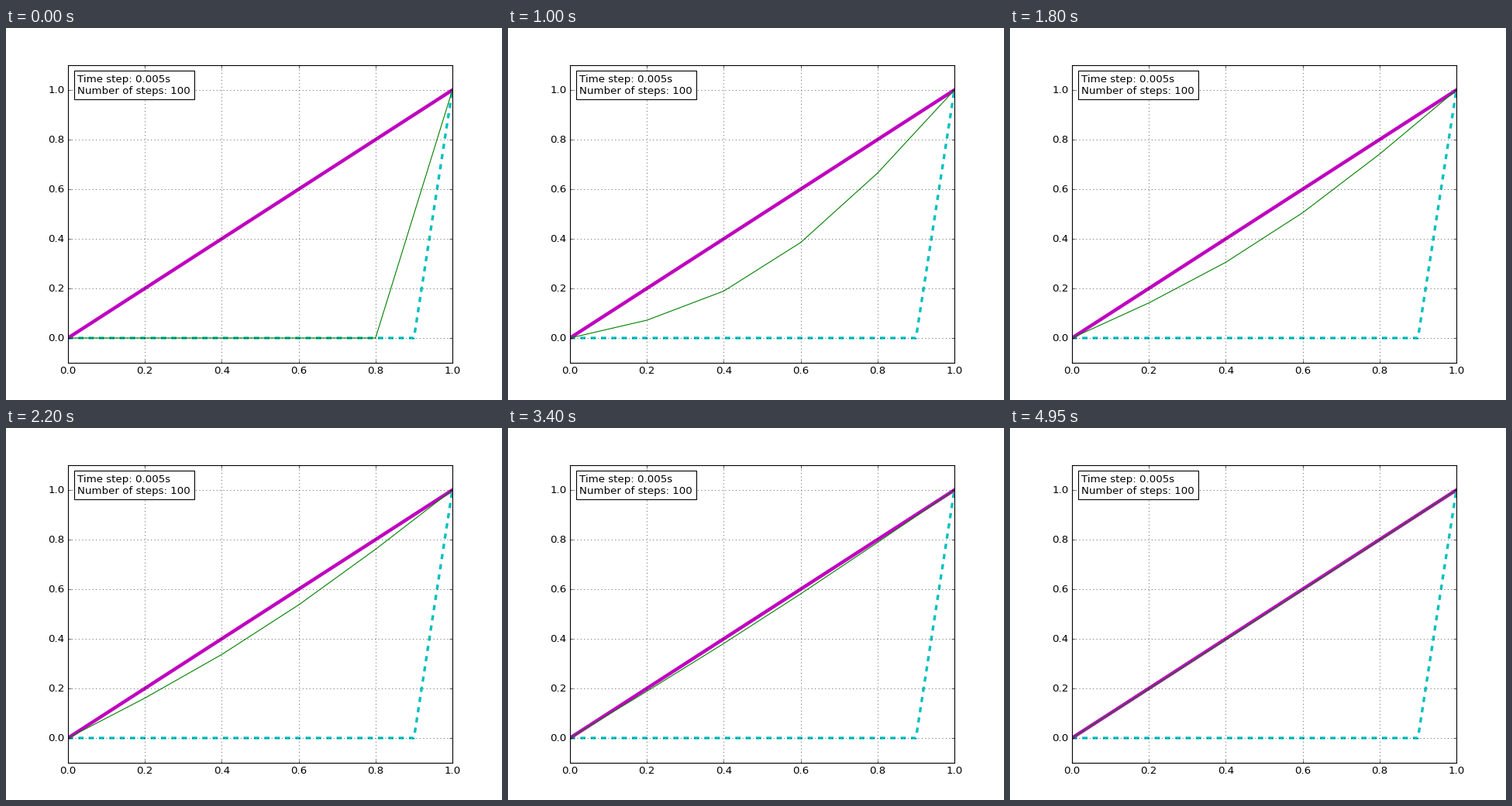
A matplotlib script that plays this animation: 640 by 480 pixels, repeating every 5000 ms.

```python
import numpy as np
import matplotlib.pyplot as plt
from matplotlib.animation import FuncAnimation

STEPS = 100
DT = 0.005
THETA = 2 / 3  # Galerkin weighting in time

plt.style.use("classic")
plt.rcParams.update({
    "font.family": "DejaVu Sans",
    "figure.facecolor": "white",
    "savefig.facecolor": "white",
    "savefig.dpi": "figure",
})


def tridiagonal(size, centre, side):
    return centre * np.eye(size) + side * (np.eye(size, k=1) + np.eye(size, k=-1))


def solve_heat(cells):
    """Linear finite elements for u_t = u_xx with u(0) = 0 and u(1) = 1."""
    h = 1 / cells
    mass = tridiagonal(cells - 1, 4 * h / 6, h / 6)
    stiff = tridiagonal(cells - 1, 2 / h, -1 / h)
    load = np.zeros(cells - 1)
    load[-1] = 1 / h

    left = mass + THETA * DT * stiff
    right = mass - (1 - THETA) * DT * stiff
    inner = np.zeros(cells - 1)
    history = []
    for _ in range(STEPS):
        history.append(np.concatenate(([0], inner, [1])))
        inner = np.linalg.solve(left, right @ inner + DT * load)
    return history


x = np.linspace(0, 1, 6)
history = solve_heat(5)

fig, ax = plt.subplots(figsize=(8, 6), dpi=80)
ax.set_xlim(0, 1)
ax.set_ylim(-0.1, 1.1)
ax.set_yticks(np.arange(6) / 5)
ax.grid(True)

ax.plot([0, 0.9, 1], [0, 0, 1], "c--", lw=3)
ax.plot([0, 1], [0, 1], "m", lw=4)
curve, = ax.plot(x, history[0], "g", lw=1)

ax.text(0.025, 0.97, f"Time step: {DT}s\nNumber of steps: {STEPS}",
        transform=ax.transAxes, va="top", bbox=dict(facecolor="white"))


def update(i):
    curve.set_ydata(history[i])
    return curve,


anim = FuncAnimation(fig, update, frames=STEPS, interval=50,
                     repeat=True, repeat_delay=0)
plt.show()
```
